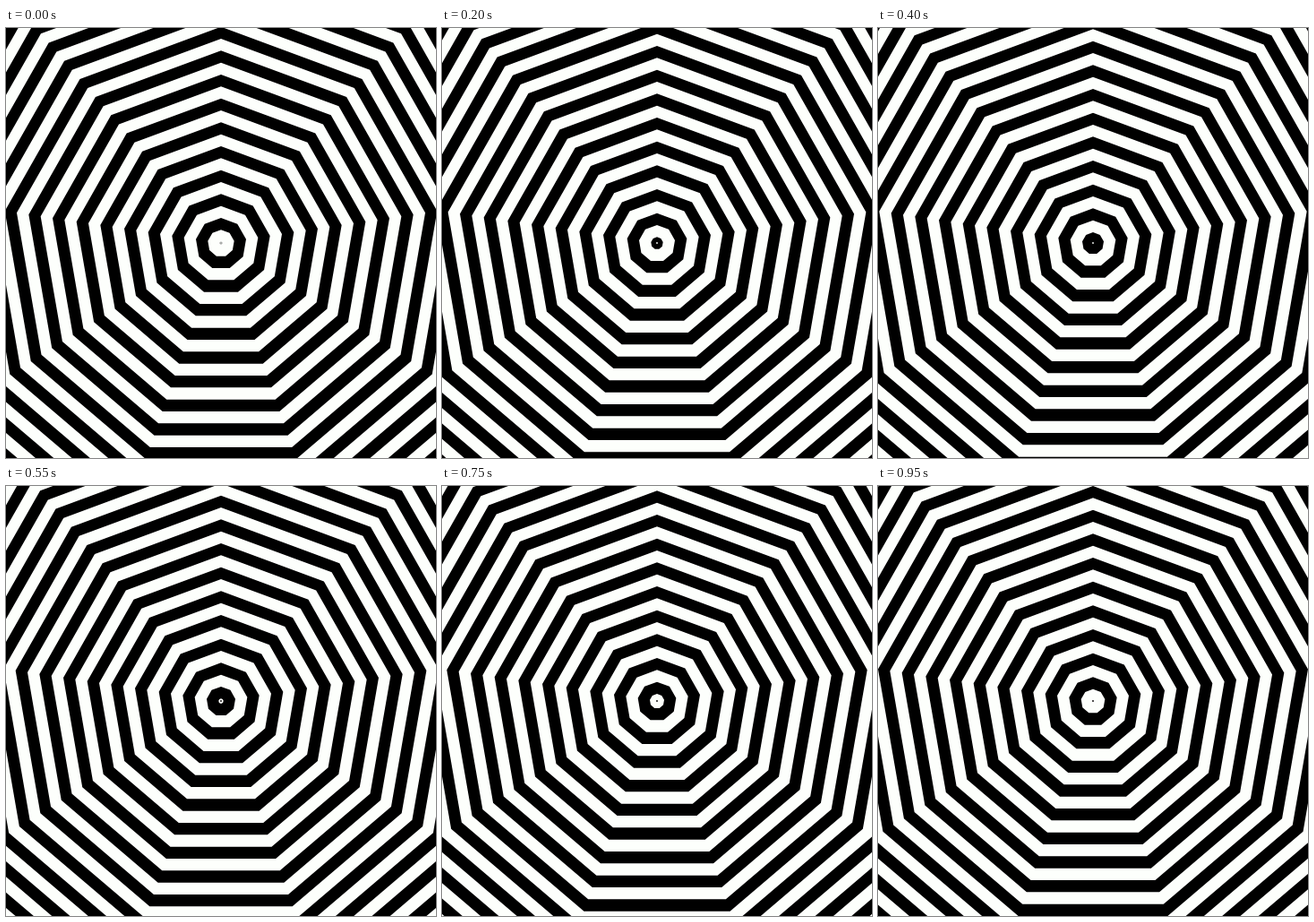
Write an HTML page that moves like this. It is 480x480 px and loops after 1 s.

```html
<!DOCTYPE html>
<html lang="en">
<head>
<meta charset="utf-8">
<title>Nonagon tunnel</title>
<style>
  html, body { margin: 0; width: 100%; height: 100%; overflow: hidden; background: #fdfffc; }
  svg { display: block; width: 100%; height: 100%; }
</style>
</head>
<body>
<svg viewBox="0 0 480 480">
  <rect width="480" height="480" fill="#fdfffc"/>
  <path id="rings" fill="#000" fill-rule="evenodd"/>
  <circle id="dot" cx="240" cy="240" r="0.9"/>
</svg>
<script>
const LOOP = 1000, STEPS = 20, CENTER = 240, RINGS = 15;
const PERIOD = 80 / 3, BAND = PERIOD / 2;
const rings = document.getElementById('rings');
const dot = document.getElementById('dot');

// Regular nonagon, point up, fitted to the square from -1 to 1.
const rad = Math.PI / 180;
const halfWidth = Math.sin(80 * rad);
const bottom = Math.cos(20 * rad);
const unit = Array.from({ length: 9 }, (_, k) => {
  const a = k * 40 * rad;
  return [Math.sin(a) / halfWidth, (1 - bottom - 2 * Math.cos(a)) / (1 + bottom)];
});

function nonagon(size) {
  const points = unit.map(([x, y]) =>
    (CENTER + x * size).toFixed(2) + ' ' + (CENTER + y * size).toFixed(2));
  return 'M' + points.join('L') + 'Z';
}

function draw(time) {
  const step = Math.floor((time % LOOP) / LOOP * STEPS);
  const first = (step + 1) * PERIOD / STEPS;
  let path = '';
  for (let n = 0; n < RINGS; n++) {
    const outer = first + n * PERIOD;
    path += nonagon(outer);
    if (outer > BAND) path += nonagon(outer - BAND);
  }
  rings.setAttribute('d', path);
  dot.setAttribute('fill', step < STEPS / 2 ? '#fdfffc' : '#000');
}

const start = performance.now();
function tick() {
  draw(performance.now() - start);
  requestAnimationFrame(tick);
}
tick();
</script>
</body>
</html>
```
